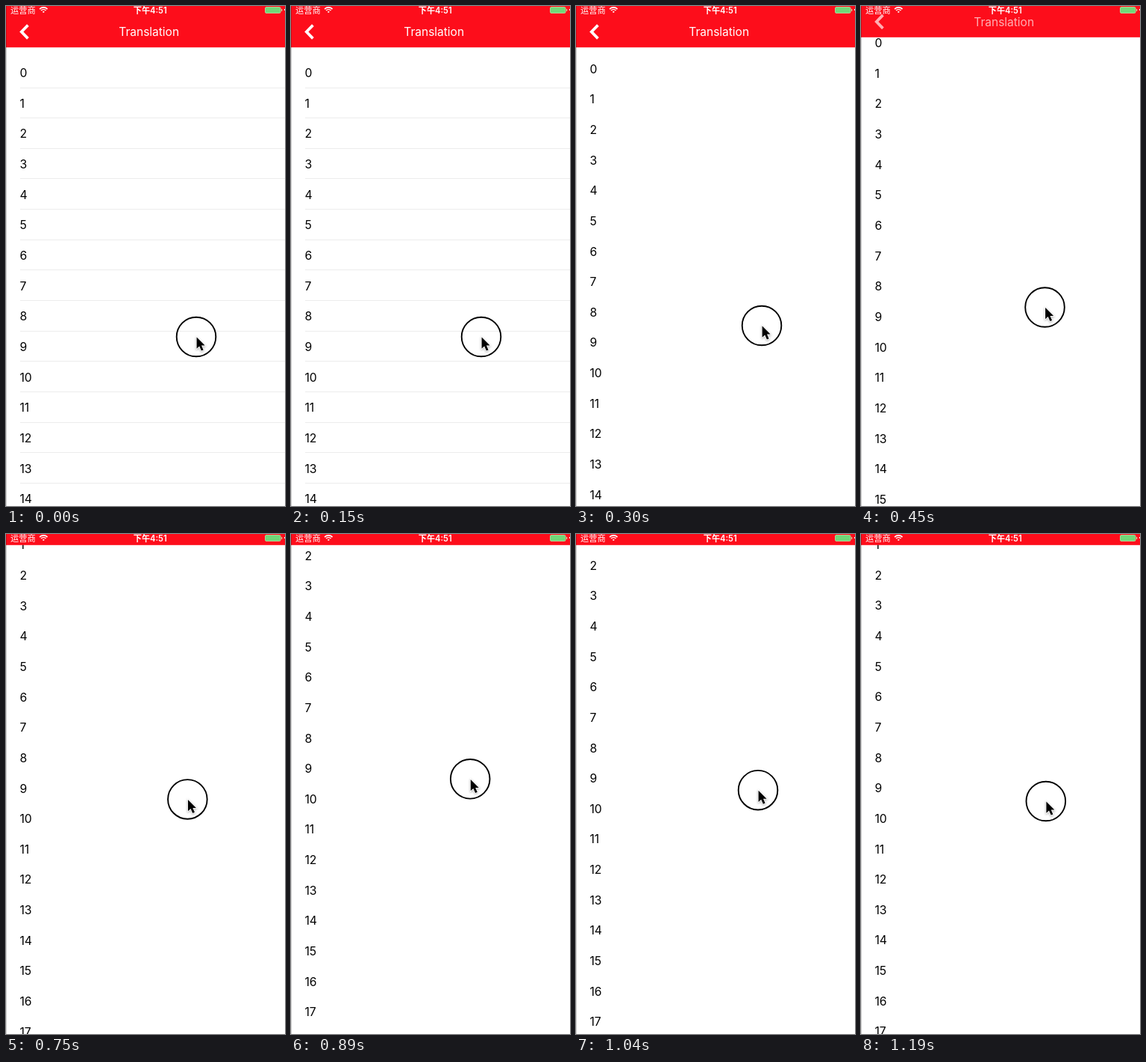
These frames come from a looping animation (374 by 668 pixels, 1330 ms). An HTML page with a canvas:

```html
<!DOCTYPE html>
<html lang="zh">
<head>
<meta charset="utf-8">
<title>Translation</title>
<style>
html, body { margin: 0; width: 100%; height: 100%; overflow: hidden; background: #fff; }
canvas { display: block; }
</style>
</head>
<body>
<canvas id="stage" width="374" height="668"></canvas>
<script>
const c = document.getElementById('stage').getContext('2d');
const W = 374, H = 668, RED = '#fd0d1b';
const LOOP = 1330, STEP = 148.5;
const ROW = 40.64, FIRST_ROW = 89.5, BAR = 55.3, COLLAPSE = 40.5, SLACK = 26;

// Drag path: step, pointer x, pointer y, list pan
const drag = [
  [1, 255, 442, 0],
  [2, 249, 427, 5.5],
  [3, 246.5, 402.5, 26.5],
  [4, 246.5, 381.5, 48.6],
  [6, 240.2, 327.3, 101.3],
  [8, 247.8, 357, 75.2]
];

const clamp = (v, lo, hi) => Math.min(hi, Math.max(lo, v));

function dragAt(step) {
  const i = Math.max(1, drag.findIndex(p => p[0] >= step));
  const a = drag[i - 1], b = drag[i];
  const f = clamp((step - a[0]) / (b[0] - a[0]), 0, 1);
  return a.map((v, k) => v + (b[k] - v) * f).slice(1);
}

function text(s, x, y, font, align = 'left') {
  c.font = font;
  c.textAlign = align;
  c.fillText(s, x, y);
}

function box(x, y, w, h, color) {
  c.fillStyle = color;
  c.fillRect(x, y, w, h);
}

function path(points) {
  c.beginPath();
  points.forEach(([x, y]) => c.lineTo(x, y));
}

function drawList(top, lines) {
  for (let i = 0; i < 20; i++) {
    const y = top + i * ROW;
    c.fillStyle = '#000';
    text(i, 18.4, y + 5.7, '15.7px Inter, sans-serif');
    if (lines) box(19, Math.floor(y + 19.5), W - 19, 1, '#ececec');
  }
}

function drawHeader(collapse) {
  box(0, 0, W, BAR - collapse, RED);
  c.save();
  c.globalAlpha = 1 - collapse / COLLAPSE;
  c.translate(0, -collapse);
  c.fillStyle = c.strokeStyle = '#fff';
  text('Translation', 191.7, 40.4, '15.5px Inter, sans-serif', 'center');
  path([[29.4, 25.7], [20.8, 34.5], [29.4, 43.3]]);
  c.lineWidth = 3.8;
  c.stroke();
  c.restore();
}

function drawStatus() {
  const cjk = '"Noto Sans CJK SC", "Noto Sans CJK", sans-serif';
  c.fillStyle = c.strokeStyle = '#fff';
  text('运营商', 6, 9.8, '11.2px ' + cjk);
  text('下午4:51', 193.2, 9.8, '600 11.2px Inter, ' + cjk, 'center');
  c.lineWidth = 1.6;
  for (const r of [1.3, 4.6, 7.4]) {
    c.beginPath();
    c.arc(50.3, 9.3, r, -Math.PI * 0.75, -Math.PI * 0.25);
    c.stroke();
  }
  c.beginPath();
  c.roundRect(347.5, 1.5, 20.5, 8, 1.5);
  c.fillStyle = '#70d878';
  c.fill();
  c.strokeStyle = '#b5cf93';
  c.lineWidth = 1;
  c.stroke();
  box(369, 4, 1.2, 3, '#c9cf9c');
  box(373, 4, 1, 2, '#fff');
}

function drawPointer(x, y) {
  c.beginPath();
  c.arc(x, y, 26.3, 0, 7);
  c.strokeStyle = '#000';
  c.lineWidth = 1.9;
  c.stroke();
  c.save();
  c.translate(x + 0.6, y + 0.6);
  path([[0, 0], [0, 15.2], [3.6, 12], [6.3, 18], [9, 16.8], [6.4, 11], [11, 11]]);
  c.closePath();
  c.shadowColor = 'rgba(0,0,0,.35)';
  c.shadowBlur = 3;
  c.shadowOffsetY = 1;
  c.strokeStyle = '#fff';
  c.lineWidth = 1.6;
  c.stroke();
  c.shadowColor = 'transparent';
  c.fillStyle = '#000';
  c.fill();
  c.restore();
}

function draw(now) {
  const step = Math.min(8, Math.floor(now % LOOP / STEP));
  const [x, y, pan] = dragAt(step);
  // The header follows the finger once the slack is used up
  const collapse = clamp(drag[0][2] - y - SLACK, 0, COLLAPSE);
  box(0, 0, W, H, '#fff');
  drawList(FIRST_ROW - collapse - pan, pan === 0);
  drawHeader(collapse);
  drawStatus();
  box(0, 0, 1, H, 'rgba(0,0,0,.18)');
  drawPointer(x, y);
  requestAnimationFrame(draw);
}
requestAnimationFrame(draw);
</script>
</body>
</html>
```
